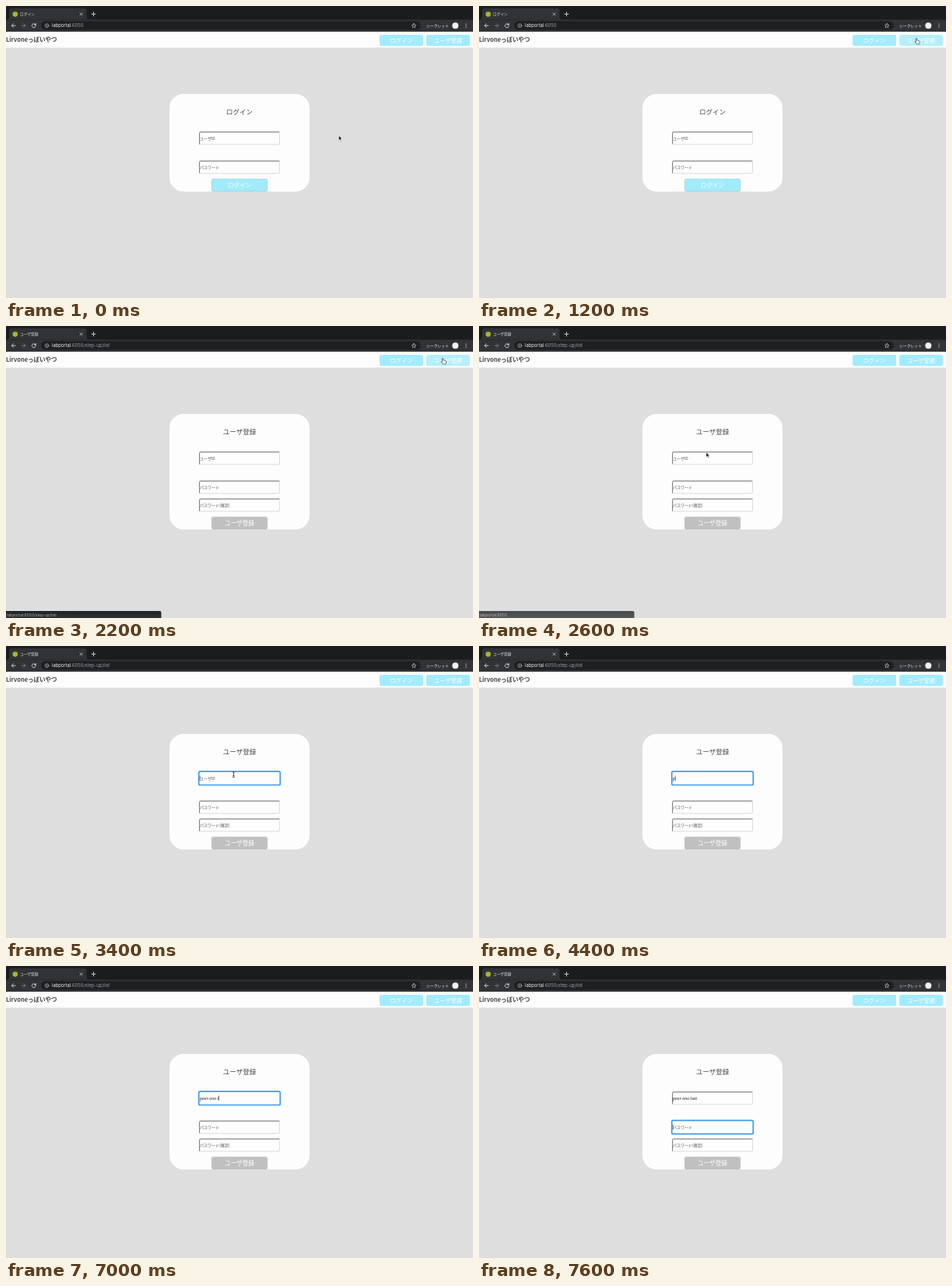
Animation, 600 px wide and 375 px high, one loop 8000 ms. Source, as an HTML page:

```html
<!DOCTYPE html>
<html lang="en">
<head>
<meta charset="utf-8">
<title>Sign up</title>
<style>
  html, body { margin: 0; width: 100%; height: 100%; overflow: hidden; background: #dedede; }
  svg { display: block; width: 600px; height: 375px; }
  text { font-family: "Noto Sans CJK JP", "Noto Sans CJK", sans-serif; white-space: pre; }
  .ui { font-family: Inter, "Noto Sans CJK JP", "Noto Sans CJK", sans-serif; }
  .mid { text-anchor: middle; }
  .label { fill: #fff; font-weight: 500; }
  .field { font-size: 5px; fill: #555; }
  .typed { fill: #111; font-weight: 500; }
  .line { fill: none; stroke-linecap: round; stroke-linejoin: round; }
</style>
</head>
<body>
<svg viewBox="0 0 600 375">
  <defs>
    <g id="box">
      <rect x=".5" y=".5" width="103" height="16" rx="1.5" fill="#fdfdfd" stroke="#dcdcdc"/>
      <path class="line" d="M.6 15.8V2Q.6.6 2 .6H103" stroke="#777"/>
    </g>
    <linearGradient id="shade" x2="0" y2="1">
      <stop stop-color="#202123"/><stop offset="1" stop-color="#303134"/>
    </linearGradient>
  </defs>

  <!-- browser chrome -->
  <rect width="600" height="18" fill="#1b1c1e"/>
  <path d="M0 17.5Q4 17.5 4 14V6Q4 3 7 3H100Q103.500 3 103.500 6V14Q103.500 17.500 107 17.500Z" fill="#323337"/>
  <rect y="17.5" width="600" height="15.500" fill="#323337"/>
  <rect x="45" y="19.500" width="488" height="11" rx="5.500" fill="#1e1f21"/>
  <circle id="favicon" cx="11.800" cy="10.600" r="3.300" fill="#a9b72c"/>
  <path id="spinner" class="line" d="M11 8.400Q12 8 12.800 8.900" stroke="#aaa" stroke-width=".8"/>
  <text id="tabTitle" class="ui" x="18" y="12.300" font-size="4.700" fill="#e2e3e5"/>
  <g class="line" stroke="#d7d8da" stroke-width=".9">
    <path d="M95 8.800l3.200 3.200m0-3.200l-3.200 3.200" stroke-width=".7"/>
    <path d="M110 10.400h5m-2.500-2.500v5"/>
    <path d="M12 25.200H7.200m2.200-2.200l-2.200 2.200 2.200 2.200"/>
    <path d="M20.200 25.200H25m-2.200-2.200l2.200 2.200-2.200 2.200" stroke="#7b7c80"/>
    <path id="reload" d="M38 24a2.500 2.500 0 1 0 .3 1.800M38.300 22.500v1.800h-1.800"/>
    <path id="stop" d="M33.800 23l4.300 4.300m0-4.300l-4.300 4.300"/>
    <g stroke="#b5b6b9" stroke-width=".7"><circle cx="52.500" cy="25.200" r="2.400"/><path d="M52.500 25v1.300m0-2.300v.05"/></g>
    <path d="M524 22.400l.8 1.900 2 .2-1.500 1.300.5 2-1.800-1.100-1.800 1.100.5-2-1.500-1.300 2-.2z" stroke-width=".6"/>
  </g>
  <text class="ui" x="59" y="27.200" font-size="5.850" fill="#eceded">labportal<tspan id="urlRest" fill="#9b9ca0"></tspan></text>
  <text x="540" y="27" font-size="4.850" fill="#eee">シークレット</text>
  <circle cx="577.300" cy="25.200" r="4" fill="#f1f1f1"/>
  <g fill="#d7d8da"><circle cx="591" cy="23.100" r=".6"/><circle cx="591" cy="25.200" r=".6"/><circle cx="591" cy="27.300" r=".6"/></g>

  <!-- page -->
  <rect y="33" width="600" height="342" fill="#dedede"/>
  <rect y="33" width="600" height="20.500" fill="#fdfdfd"/>
  <text y="46.200" font-size="7.500" font-weight="600" fill="#444">Lirvoneっぽいやつ</text>
  <rect x="480" y="37" width="56" height="14.300" rx="2.500" fill="#a2ebfd"/>
  <text class="mid label" x="508" y="46.500" font-size="7.200">ログイン</text>
  <rect id="signupLink" x="540" y="37" width="56" height="14.300" rx="2.500"/>
  <text class="mid label" x="568" y="46.500" font-size="7.200">ユーザ登録</text>

  <rect id="card" x="210" y="113" width="180" rx="18" fill="#fdfdfd"/>
  <text id="heading" class="mid" x="300" y="139" font-size="8.500" fill="#4a4a4a"/>
  <use href="#box" x="248" y="161.300"/>
  <use href="#box" x="248" y="198.500"/>
  <rect id="ring" x="247.700" width="104.600" height="17.400" rx="1.800" fill="#fdfdfd" stroke="#3f9ae6" stroke-width="1.700"/>
  <text id="userText" x="249" y="171.600" class="field"/>
  <text x="249" y="208.900" class="field">パスワード</text>
  <g id="confirm">
    <use href="#box" x="248" y="221.500"/>
    <text x="249" y="231.900" class="field">パスワード(確認)</text>
  </g>
  <rect id="submit" x="264.300" width="71.400" height="15.800" rx="2" stroke-width=".6"/>
  <text id="submitText" class="mid label" x="300" font-size="7.600"/>
  <rect id="caret" width=".6" height="6.400" fill="#222"/>

  <g id="status">
    <path d="M0 366H197.500Q199.500 366 199.500 368V375H0Z" fill="url(#shade)"/>
    <text id="statusText" class="ui" x="1" y="372.700" font-size="5.050" fill="#a4a5a8"/>
  </g>

  <!-- pointers, each with its hot spot at 0,0 -->
  <path id="arrow" d="M0 0V6.200L1.400 4.900 2.300 7 3.300 6.600 2.400 4.500H4.300Z" fill="#111" stroke="#fff" stroke-width=".5"/>
  <path id="hand" d="M-.6.500Q-.5-.3.200 0L.7.600 1 2.600Q2 2 2.400 2.900 3.500 2.600 3.700 3.500 4.600 3.500 4.500 4.500L4 7.500H.7L-1.700 4.600Q-1.900 3.600-.9 3.900L-.2 4.500Z" fill="#fff" stroke="#222" stroke-width=".6"/>
  <path id="beam" class="line" d="M-1.200-3.400Q0-3.400 0-2.600V2.600Q0 3.400-1.200 3.400M1.200-3.400Q0-3.400 0-2.600M1.200 3.400Q0 3.400 0 2.600M-.7 1.200H.7" stroke="#222" stroke-width=".7"/>
</svg>
<script>
const LOOP = 8000, TICK = 200;
const HOST = ":6050", PATH = "/step-up/list", LONG = "labportal" + HOST + PATH;
const USER = "peer-one-last";
const el = id => document.getElementById(id);

const start = {
  page: "login", loading: false, path: "", status: "", fade: 1,
  pointer: "arrow", hover: false, focus: 0, caret: false, typed: 0
};
// [time, what changes]
const steps = [
  [1200, { pointer: "hand", hover: true }],
  [1400, { status: LONG }],
  [1600, { loading: true, path: PATH }],
  [2200, { page: "signup", loading: false }],
  [2400, { status: "labportal" + HOST, hover: false }],
  [2600, { pointer: "arrow", fade: .78 }],
  [2800, { status: "", fade: 1 }],
  [3000, { pointer: "beam" }],
  [3200, { focus: 1, caret: true }],
  [3800, { caret: false }],
  [4200, { pointer: "", caret: true }],
  [4400, { typed: 1 }],
  [4800, { typed: 2 }],
  [5000, { typed: 3 }],
  [5200, { typed: 4 }],
  [5400, { caret: false }],
  [5600, { typed: 5, caret: true }],
  [5800, { typed: 6 }],
  [6200, { typed: 7 }],
  [6400, { typed: 8 }],
  [6800, { typed: 9 }],
  [7000, { typed: 10 }],
  [7200, { typed: 12 }],
  [7400, { typed: 13 }],
  [7600, { focus: 2 }]
];
// pointer path: [time, x, y]
const track = [
  [200, 427.5, 166.3], [1200, 561.8, 41.5], [1800, 561.8, 41.5], [2000, 561, 41.5],
  [2200, 561, 41.5], [2400, 507, 44], [2600, 292, 162.3], [2800, 292.5, 165.3]
];

function pointerAt(t) {
  const next = track.findIndex(p => p[0] > t);
  if (next === 0) return track[0].slice(1);
  if (next < 0) return track.at(-1).slice(1);
  const [t0, x0, y0] = track[next - 1], [t1, x1, y1] = track[next];
  const k = (t - t0) / (t1 - t0), e = k * k * (3 - 2 * k);
  return [x0 + (x1 - x0) * e, y0 + (y1 - y0) * e];
}

const set = (id, attrs) => {
  for (const name in attrs) el(id).setAttribute(name, attrs[name]);
};
const show = (id, on) => { el(id).style.display = on ? "" : "none"; };
const write = (id, text) => { el(id).textContent = text; };

function draw(t) {
  const s = Object.assign({}, start, ...steps.filter(p => p[0] <= t).map(p => p[1]));
  const signup = s.page === "signup";
  const name = signup ? "ユーザ登録" : "ログイン";

  write("tabTitle", s.loading ? LONG : name);
  write("urlRest", HOST + s.path);
  show("favicon", !s.loading);
  show("spinner", s.loading);
  show("reload", !s.loading);
  show("stop", s.loading);
  set("spinner", { transform: `rotate(${(t - 2000) * .6} 11.8 10.6)` });

  set("signupLink", { fill: s.hover ? "#b5effd" : "#a2ebfd" });
  set("card", { height: signup ? 148.3 : 125.3 });
  write("heading", name);
  show("confirm", signup);
  const top = signup ? 245.2 : 222.2;
  set("submit", {
    y: top, fill: signup ? "#c0c0c0" : "#a2ebfd", stroke: signup ? "#b8b8b8" : "#8fc5d3"
  });
  set("submitText", { y: top + 10.4 });
  write("submitText", name);

  write("userText", s.typed ? USER.slice(0, s.typed) : "ユーザID");
  set("userText", { class: s.typed ? "field typed" : "field" });
  show("ring", s.focus);
  show("caret", s.focus && s.caret);
  const fieldTop = s.focus === 2 ? 198.3 : 161.1;
  const typedWidth = s.focus === 1 && s.typed ? el("userText").getComputedTextLength() : 0;
  set("ring", { y: fieldTop });
  set("caret", { x: 248.8 + typedWidth, y: fieldTop + 5.4 });

  show("status", s.status);
  set("status", { opacity: s.fade });
  write("statusText", s.status);

  const [x, y] = pointerAt(t);
  for (const id of ["arrow", "hand", "beam"]) {
    show(id, s.pointer === id);
    set(id, { transform: `translate(${x} ${y})` });
  }
}

const begin = performance.now();
function frame() {
  const t = (performance.now() - begin) % LOOP;
  draw(Math.floor(t / TICK) * TICK);
  requestAnimationFrame(frame);
}
frame();
</script>
</body>
</html>
```
